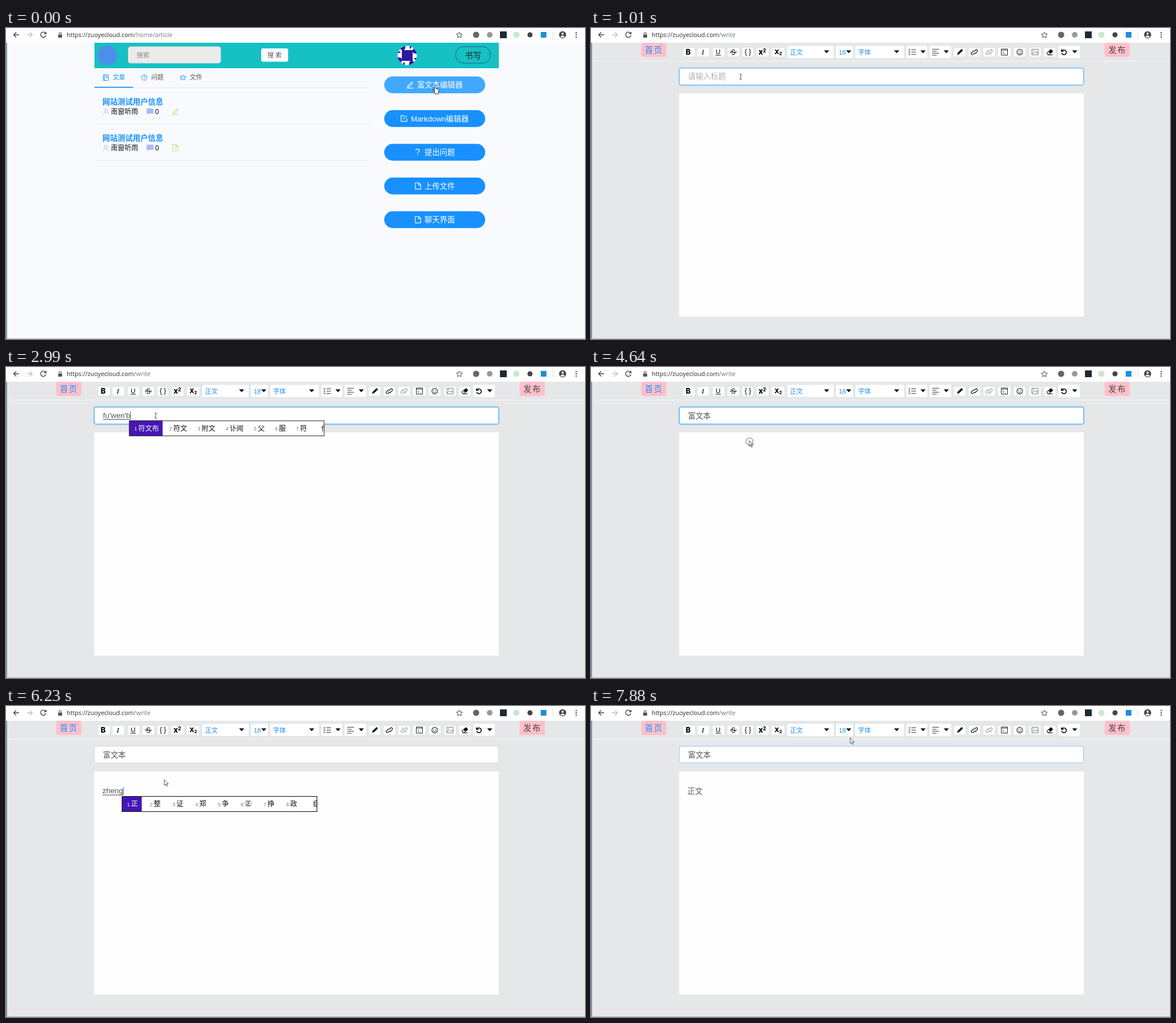
An HTML page that plays this animation: 1021 by 549 pixels, repeating every 8 s.

```html
<!DOCTYPE html>
<html lang="zh-CN">
<head>
<meta charset="utf-8">
<title>富文本编辑器</title>
<style>
html, body { margin: 0; width: 100%; height: 100%; overflow: hidden; background: #fff; }
svg { display: block; }
#stage { font-family: "Liberation Sans", "Noto Sans CJK SC", "Noto Sans CJK", sans-serif; }
.url { font-family: "Open Sans", sans-serif; }
.serif { font-family: "Liberation Serif", serif; }
.heavy { font-family: Inter, sans-serif; font-weight: 800; }
</style>
</head>
<body>
<svg id="stage" width="1021" height="549" viewBox="0 0 1021 549"></svg>
<script>
const LOOP = 8000, BLUE = '#1890ff', INK = '#111';

// Markup helpers
const rect = (x, y, w, h, fill, r = 0, more = '') =>
  `<rect x="${x}" y="${y}" width="${w}" height="${h}" rx="${r}" fill="${fill}" ${more}/>`;
const disc = (x, y, r, fill, more = '') => `<circle cx="${x}" cy="${y}" r="${r}" fill="${fill}" ${more}/>`;
const text = (x, y, size, str, fill, more = '') =>
  `<text x="${x}" y="${y}" font-size="${size}" fill="${fill}" ${more}>${str}</text>`;
const line = (d, color, w = 1, more = '') =>
  `<path d="${d}" fill="none" stroke="${color}" stroke-width="${w}" ${more}/>`;
const shape = (d, fill) => `<path d="${d}" fill="${fill}"/>`;
const at = (x, y, body) => `<g transform="translate(${x} ${y})">${body}</g>`;
const group = (id, body) => `<g id="${id}">${body}</g>`;

// Small icons, drawn from their top left corner
const icon = {
  pen: c => line('M1.5 8.5L8 1.5l2 2L3.5 10l-2.4.5zM0 12h11.5', c, 1.1),
  edit: c => line('M7 1H.8v10.2H11V6M4.5 7.5L11 1', c, 1.2),
  ask: c => line('M1.5 3.4C1.5-.6 8-.4 8 3.2 8 5.7 4.8 5.2 4.8 8.2M4.8 9.8v1.5', c, 1.2),
  file: c => line('M.8.6h6l3.6 3.6v7.6H.8zM6.5.6v4h4', c, 1.1),
  book: c => line('M.6.6h8.8v10H.6zM2.8.6v10M5.5 2.5v3h1.8v-3', c),
  help: c => line('M5 .5a4.9 4.9 0 1 1-.1 0M3.4 4.3c0-2.2 3.3-2 3.3 0C6.7 5.5 5 5.4 5 6.7M5 7.6v1', c),
  crown: c => line('M.7 2.5l2 2L5 1l2.3 3.5 2-2L8.4 9H1.6zM4 6.5h2', c),
  user: c => line('M5.2.6a2.7 2.7 0 1 1-.1 0M.6 11.2c0-6 9.2-6 9.2 0', c),
  chat: c => shape('M1 0h10q1 0 1 1v7q0 1-1 1H5l-2.6 2V9H1Q0 9 0 8V1Q0 0 1 0z', c),
  down: c => shape('M0 0h9L4.5 5z', c),
};

function browserBar(path) {
  return rect(0, 0, 1021, 26, '#fff') +
    line('M23 12H13.5M18 7.5L13.5 12l4.5 4.5', '#444', 1.4) +
    line('M37 12h9.5M42 7.5l4.5 4.5-4.5 4.5', '#c0c0c0', 1.4) +
    line('M69.6 9A4.7 4.7 0 1 0 70.4 13M70.6 7v3.2h-3.4', '#444', 1.4) +
    rect(92, 11.5, 7, 5.5, '#555', .8) + line('M93.6 11.5V10a1.9 1.9 0 0 1 3.8 0v1.5', '#555', 1.1) +
    text(107, 16, 10.8, `https://zuoyecloud.com<tspan fill="#70757a">${path}</tspan>`, '#2a2c30', 'class="url"') +
    line('M799.5 7l1.6 3.5 3.7.4-2.8 2.5.8 3.7-3.3-1.9-3.3 1.9.8-3.7-2.8-2.5 3.7-.4z', '#444') +
    disc(829, 12, 5.5, '#666') + disc(853, 12, 5, '#999') + rect(871, 6, 12, 12, '#1c2b33') +
    disc(900, 12, 5.5, '#c9e8cf') + disc(924, 12, 4.5, '#444') + rect(943, 7, 10, 10, '#1a8fdc') +
    rect(964, 5, 1, 14, '#ddd') + disc(981.5, 12, 6.2, '#444') + disc(981.5, 10, 2, '#fff') +
    shape('M977.5 15.5q4-4.5 8 0-4 3-8 0z', '#fff') +
    [8, 12, 16].map(y => disc(1005.5, y, 1.2, '#444')).join('');
}

const frameLines = rect(0, 26, 2, 523, '#8795b3') + rect(0, 548, 1021, 1, '#a9abb0');

function homePage() {
  const avatar = disc(0, 0, 17, '#fff') +
    [0, 90, 180, 270].map(a => `<g transform="rotate(${a})">` +
      shape('M-12.5-11.5Q-8-16-3-16.8L-4-11-8-8.5z', '#2c1a9c') +
      shape('M-9.5-9.5H0V-8H-1V-1H-8V0H-9.5z', '#2c1a9c') +
      shape('M4-16.5l4 1.5-3 4z', '#2c1a9c') + '</g>').join('') +
    rect(-1.5, -9.5, 3, 19, '#2c1a9c') + rect(-9.5, -1.5, 19, 3, '#2c1a9c');
  const tabs = [['book', '文章', 171, BLUE], ['help', '问题', 239, '#595959'], ['crown', '文件', 307, '#595959']]
    .map(([i, s, x, c]) => at(x, 82, icon[i](i === 'book' ? c : BLUE)) + text(x + 17, 91, 11, s, c)).join('');
  const post = (y, mark) => at(0, y,
    text(170, 29, 13.4, '网站测试用户信息', BLUE, 'font-weight="700"') +
    at(171, 36, icon.user('#a9bff5')) + text(185, 46, 12, '南窗听雨', INK) +
    at(248, 36, icon.chat('#a5bcf8')) + text(263, 46, 12, '0', INK) +
    at(293, 35, icon[mark]('#b0e884')) + rect(156, 63, 490, 1, '#e8e8e8'));
  const actions = [['pen', '富文本编辑器', 707, 725], ['edit', 'Markdown编辑器', 696, 714],
    ['ask', '提出问题', 721, 738], ['file', '上传文件', 721, 738], ['file', '聊天界面', 721, 738]]
    .map(([i, s, ix, tx], n) => at(0, 85.6 + 59.5 * n,
      rect(667, 0, 178, 29.6, n ? BLUE : '#40a9ff', 14.8) +
      at(ix, 8.5, icon[i]('#fff')) + text(tx, 19.6, 13.4, s, '#fff'))).join('');
  return rect(0, 26, 1021, 523, '#f9fafd') + browserBar('/home/article') + frameLines +
    rect(156, 26, 713, 45, '#15c1c3') + disc(178.5, 48.5, 17.5, '#4d8fe8') +
    rect(215.5, 33, 163, 29, '#ebebeb', 4, 'stroke="#d9d9d9"') + text(230, 52, 11.5, '搜索', '#8c8c8c') +
    rect(450, 36, 47.5, 23.5, '#fff', 3) + text(461, 51.5, 11, '搜 索', '#555') +
    at(707.5, 48.5, avatar) +
    rect(793, 33, 61, 29, 'none', 13, 'stroke="#35508a"') + text(809, 53.5, 14.6, '书写', '#222') +
    rect(156, 105, 490, 1, '#e8e8e8') + tabs + rect(156, 103.7, 68, 1.8, BLUE) +
    post(106, 'pen') + post(170, 'file') + text(295.5, 214, 5, 'M', '#b0e884') + actions;
}

function toolbar() {
  const keys = [[163, 20], [188, 20], [215, 20], [241, 20], [267, 19], [292, 21], [319, 22], [640, 20], [666, 20],
    [692, 20], [718, 22], [746, 20], [773, 20], [799, 20]].map(([x, w]) => rect(x, 35, w, 15.5, '#fff', 2)).join('');
  const menus = [[346, 82, 411], [432, 30, 450], [466, 86, 534.5], [556, 37, 581], [597, 38, 622], [824, 38, 848.5]]
    .map(([x, w, a]) => rect(x, 31.5, w, 21.5, '#fff', 2) + at(a, 39.5, icon.down('#000'))).join('');
  const chain = c => line('M-.5 2.2l-1.6 1.6a2 2 0 0 1-2.9-2.9L-2.6-1.5a2 2 0 0 1 3 0M.5-2.2L2.1-3.8A2 2 0 0 1 5-.9L2.6 1.5a2 2 0 0 1-3 0', c, 1.3);
  return keys + menus +
    text(167, 47, 13, 'B', '#000', 'class="heavy"') +
    text(195, 47, 13.5, 'I', '#000', 'class="serif" font-style="italic"') +
    text(220, 46, 11.5, 'U', '#000') + rect(219.5, 47.5, 9.5, 1, '#000') +
    text(247, 47, 12, 'S', '#000') + rect(245, 42, 12, 1.1, '#000') +
    text(271, 46, 12, '{ }', '#000') +
    text(295.5, 47, 13, 'x<tspan font-size="8.5" dy="-4">2</tspan>', '#000', 'class="heavy"') +
    text(323.5, 46, 11, 'X<tspan font-size="7.5" dy="2">2</tspan>', '#000', 'class="heavy"') +
    text(351, 46.5, 11.2, '正文', BLUE) + text(437, 46.5, 11.2, '18', BLUE) + text(471, 46.5, 11.2, '字体', BLUE) +
    [38.5, 42.5, 46.5].map(y => disc(561.5, y, 1.2, 'none', 'stroke="#333" stroke-width=".7"') +
      rect(565, y - .5, 8, 1, '#333')).join('') +
    line('M601.5 37.5h12M601.5 41h8M601.5 44.5h12M601.5 48h8', '#333') +
    shape('M645.5 47.5l1.2-3.8 6.3-6.2q2.6-.2 2.6 2.4l-6.4 6.2z', '#000') +
    at(676, 42.8, chain('#222')) +
    at(702, 42.8, chain('#aaa') + line('M-4.5-4.5l9 9', '#aaa')) +
    line('M723.5 37h11v11h-11zM723.5 39h11', '#222') + text(725.5, 46, 6, '#_', '#222') +
    disc(756, 42.6, 5, 'none', 'stroke="#222" stroke-width="1.1"') + disc(754.2, 41.2, .8, '#222') +
    disc(757.8, 41.2, .8, '#222') + line('M753.3 43.8q2.7 3 5.4 0', '#222') +
    line('M777.5 37.5h11v10h-11zM778 46l3-3.5 2 2 2.5-3 3 4', '#777') + disc(780.4, 40, .9, '#777') +
    at(809, 42.8, '<g transform="rotate(-40)">' + rect(-5.5, -2.8, 11, 5.6, '#000', 1) +
      rect(-4.6, -1.9, 3.6, 3.8, '#fff') + '</g>') + rect(805, 47, 9, 1, '#000') +
    line('M830.5 40.5a4.2 4.2 0 1 1-.6 3.6', '#000', 1.6) + shape('M829 37v5h5z', '#000');
}

function writePage() {
  const tab = (x, s, c) => rect(x, 26, 44.5, 25.3, '#ffc0cb', 4) +
    text(x + 6.5, 43.5, 14.3, s, c, 'letter-spacing="1.8"');
  return rect(0, 26, 1021, 523, '#e5e7e9') + browserBar('/write') + frameLines +
    rect(2, 58, 1019, 1, '#f6f7f8') + tab(88.5, '首页', BLUE) + tab(905.7, '发布', '#444') + toolbar() +
    `<rect id="glow" x="155" y="70" width="714.5" height="31.5" rx="4" fill="none" stroke="${BLUE}" stroke-opacity=".3" stroke-width="2"/>` +
    '<rect id="box" x="156" y="71" width="712.5" height="29.5" rx="3" fill="#fff"/>' +
    rect(155.5, 115.5, 713.5, 394, '#fefefe') +
    '<text id="title" x="171" font-size="13.4"/><text id="body" x="170" font-size="13.4" fill="#555"/>' +
    rect(0, 0, 0, .9, '#333', 0, 'id="under"') + rect(0, 0, .8, 14, '#333', 0, 'id="caret"') +
    group('status', rect(1, 537, 339, 13, '#f6f7f9', 2) +
      text(3.5, 548, 9.2, 'https://zuoyecloud.com/write', '#8a8d91', 'class="url"')) +
    '<svg id="ime" width="345" height="28"></svg>';
}

const pointer = {
  hand: '<path d="M-1.5 7V-5.2a1.2 1.2 0 0 1 2.4 0V0l4 .9q1.4.4 1.3 2L5.6 7v2.3h-6V8L-4.8 3q-.2-1.8 1.6-.7L-1.5 4z" fill="#fff" stroke="#333"/>',
  arrow: '<path d="M0 0v10.2l2.4-2.1 1.6 3.6 1.6-.7L4 7.5h3.2z" fill="#fff" stroke="#444" stroke-width=".9"/>',
  beam: line('M-2-4.5h1.4l.6.6.6-.6H2M0-4v8M-2 4.5h1.4l.6-.6.6.6H2', '#333', .9),
};

const stage = document.getElementById('stage');
stage.innerHTML = group('home', homePage()) + group('write', writePage()) + group('mouse', '') +
  disc(279.5, 131.5, 6.3, 'none', 'id="ring" stroke="#555" stroke-width=".9"');
const $ = id => document.getElementById(id);
const set = (id, attrs) => { for (const k in attrs) $(id).setAttribute(k, attrs[k]); };
const show = (id, on) => set(id, { opacity: +on });

// Pinyin input: [time, typed text, candidates, popup opacity]
const TITLE = [
  [0, ''],
  [1990, 'f', '发 非 父 方 放 风 分 房 法', .52],
  [2140, 'fu', '父 付 服 富 副 福 复 负 府'],
  [2420, "fu'w", '服务 父 付 服 富 副 福 复 负'],
  [2570, "fu'we", '服务 父 付 服 富 副 福 复 负'],
  [2720, "fu'wen", '符文 附文 讣闻 父 服 符 付 福 府'],
  [2990, "fu'wen'b", '符文布 符文 附文 讣闻 父 服 符 付'],
  [3300, "fu'wen'be", '富文本 符文 附文 讣闻 父 服 符 付'],
  [3430, "fu'wen'ben", '富文本 符文 附文 讣闻 父 服 符 付'],
  [3700, '富文本'],
];
const BODY = [
  [0, ''],
  [5420, 'z', '在 中 这 做 再 最 张 走 真', .52],
  [5560, 'z', '在 中 这 做 再 最 张 走 真'],
  [5700, 'zh', '中 这 张 真 周 只 着 找 种'],
  [5960, 'zhe', '这 着 者 折 哲 遮 浙 蔗 辙'],
  [6100, 'zhen', '真 阵 镇 针 震 珍 振 枕 侦'],
  [6230, 'zheng', '正 整 证 郑 争 ㊣ 挣 政 症'],
  [6750, "zheng'we", '正文 正 整 证 郑 争 挣 政 症'],
  [6900, "zheng'wen", '正文 正 整 证 郑 争 挣 政 症'],
  [7050, '正文'],
];
const MOUSE = [
  [0, 'hand', 757, 107], [140, 'arrow', 600, 112], [290, 'arrow', 420, 125], [440, 'arrow', 350, 112],
  [580, 'beam', 300, 97], [720, 'beam', 276, 89], [850, 'beam', 264, 86], [4260, 'beam', 266, 93],
  [4400, 'arrow', 273, 112], [4520, 'arrow', 279, 130], [7610, 'arrow', 318, 112],
  [7750, 'beam', 392, 88], [7880, 'arrow', 457, 56],
];
const GLOW = [[0, 0], [990, .5], [1130, 1], [4760, .5], [4900, 0]];
const now = (list, t) => list.findLast(row => row[0] <= t);
const within = (t, a, b) => t >= a && t < b;

function candidates(words) {
  const list = words.split(' '), extra = list.every(w => w.length === 1) ? 2.8 : 0;
  let x = 9.5;
  const items = list.map((w, i) => {
    const c = i ? INK : '#fff', last = i === list.length - 1;
    const out = (last ? '' : text(x, 18, 8.8, i + 1, i ? '#777' : '#fff')) + text(x + 7, 18.3, 12.2, w, c);
    x += 25 + 12.3 * w.length + extra;
    return out;
  }).join('');
  return rect(0, 0, 345, 28, '#fff') + rect(0, 0, 23.5 + 12 * list[0].length, 28, '#4616b4') + items +
    rect(.6, .6, 343.8, 26.8, 'none', 0, 'stroke="#222" stroke-width="1.2"');
}

function setText(id, str, y) {
  const han = str > '~';
  $(id).textContent = str;
  set(id, { y: y + (han ? 1 : 0) });
}

let lastKey;
function draw(t) {
  const head = now(TITLE, t), main = now(BODY, t), mouse = now(MOUSE, t), glow = now(GLOW, t)[1];
  const inBody = t >= 4760, row = inBody ? main : head;
  const caretOn = within(t, 1250, 4400) || within(t, 4900, 7750);
  const key = [head[0], main[0], mouse[0], glow, inBody, caretOn, within(t, 4640, 4760), t < 140, now([[0], [290], [440]], t)].join();
  if (key === lastKey) return;
  lastKey = key;

  show('home', t < 140);
  show('write', t >= 140);
  show('status', 0);
  if (t < 440) set('status', { opacity: t < 290 ? 1 : .8 });
  $('mouse').innerHTML = at(mouse[2], mouse[3], pointer[mouse[1]]);
  show('ring', within(t, 4640, 4760));

  set('glow', { opacity: glow });
  const hover = mouse[1] === 'beam' || t >= 7750;
  set('box', { stroke: glow ? '#57b0f8' : hover ? '#8cc8f8' : '#d5d7d9' });
  set('title', { fill: head[1] ? '#555' : '#b0b0b0' });
  setText('title', head[1] || '请输入标题', head[1] ? 90 : 89.3);
  setText('body', main[1], 154);

  const x0 = inBody ? 170 : 171, y0 = inBody ? 143 : 78.5;
  const width = row[1] ? $(inBody ? 'body' : 'title').getComputedTextLength() : 0;
  set('caret', { x: x0 + width, y: y0, opacity: +caretOn });
  set('under', { x: x0, y: y0 + 13.6, width: row[2] ? width : 0 });
  $('ime').innerHTML = row[2] ? candidates(row[2]) : '';
  set('ime', { x: x0 + width - 2.6, y: inBody ? 159 : 94.3, opacity: row[3] || 1 });
}

function tick() {
  draw(performance.now() % LOOP);
  requestAnimationFrame(tick);
}
tick();
</script>
</body>
</html>
```
